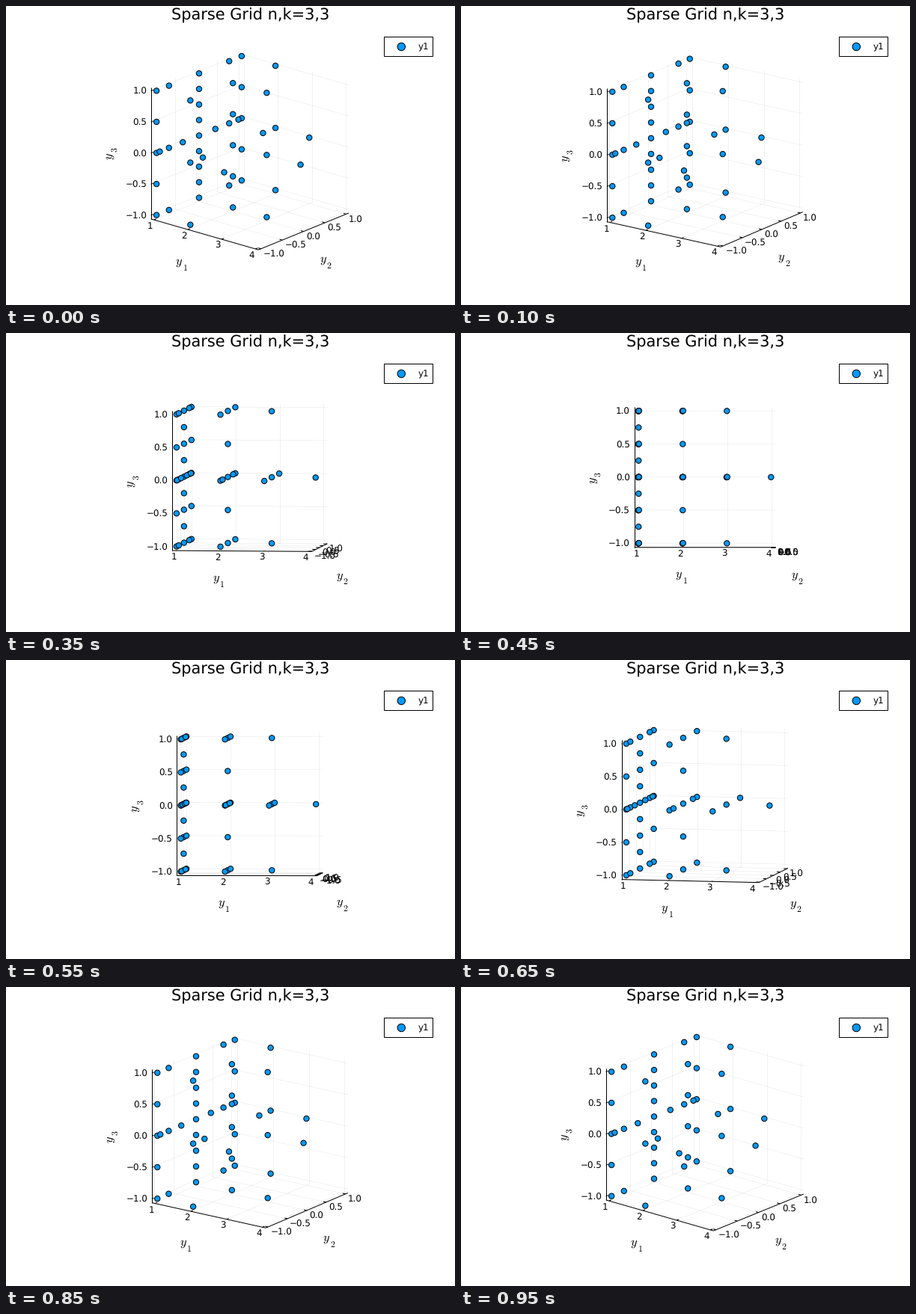
A matplotlib script that plays this animation: 600x400 px, repeating every 1 s.

```python
import itertools

import matplotlib.pyplot as plt
import numpy as np
from matplotlib.animation import FuncAnimation
from matplotlib.collections import LineCollection
from matplotlib.patches import Rectangle

WIDTH, HEIGHT, DPI = 600, 400, 100
FRAMES, INTERVAL = 20, 50
PT = 72 / DPI
BLUE = "#009afa"
CENTER = np.array([325.8, 192.8])
SCALE = 93.8
TICK_PX, GUIDE_PX, SUB_PX, TITLE_PX = 11.9, 16.4, 11.9, 20.9
TICK_LEN = 0.05
PAD = 1.06

plt.rcParams["font.family"] = "DejaVu Sans"
plt.rcParams["mathtext.fontset"] = "cm"
plt.rcParams["text.hinting"] = "none"


def norm_x(value):
    return (value - 2.5) / (1.5 * PAD)


def norm_yz(value):
    return value / PAD


X_TICKS = [1, 2, 3, 4]
YZ_TICKS = [-1, -0.5, 0, 0.5, 1]


def new_nodes(level, kind):
    """Nodes that a one-dimensional rule adds at the given level."""
    if kind == "count":
        return [level + 1]
    if level == 0:
        return [0.0]
    if level == 1:
        return [-1.0, 1.0]
    steps = np.arange(1, 2**level, 2) / 2**level
    return -np.cos(np.pi * steps) if kind == "chebyshev" else 2 * steps - 1


def sparse_grid(depth=3):
    levels = [lv for lv in itertools.product(range(depth + 1), repeat=3) if sum(lv) <= depth]
    points = []
    for a, b, c in sorted(levels, key=sum):
        points += itertools.product(
            new_nodes(a, "count"), new_nodes(b, "chebyshev"), new_nodes(c, "uniform")
        )
    points = np.array(points)
    return np.column_stack([norm_x(points[:, 0]), norm_yz(points[:, 1:])])


def camera(frame):
    azimuth = 20 * (1 + np.cos(2 * np.pi * frame / (FRAMES - 1)))
    return np.radians(azimuth), np.radians(azimuth / 2)


def project(points, azimuth, elevation):
    x, y, z = np.moveaxis(np.asarray(points, float), -1, 0)
    right = np.cos(azimuth) * x + np.sin(azimuth) * y
    depth = np.cos(azimuth) * y - np.sin(azimuth) * x
    up = np.sin(elevation) * depth + np.cos(elevation) * z
    return CENTER + SCALE * np.stack([right, -up], axis=-1)


XS = [norm_x(v) for v in X_TICKS]
YS = [norm_yz(v) for v in YZ_TICKS]
POINTS = sparse_grid()

GRID = []
for x in XS:
    GRID += [[(x, -1, -1), (x, 1, -1)], [(x, 1, -1), (x, 1, 1)]]
for v in YS:
    GRID += [
        [(-1, v, -1), (1, v, -1)],
        [(-1, v, -1), (-1, v, 1)],
        [(-1, -1, v), (-1, 1, v)],
        [(-1, 1, v), (1, 1, v)],
    ]

AXES = [
    [(-1, -1, -1), (1, -1, -1)],
    [(1, -1, -1), (1, 1, -1)],
    [(-1, -1, -1), (-1, -1, 1)],
]
AXES += [[(x, -1, -1), (x, -1 + TICK_LEN, -1)] for x in XS]
AXES += [[(1, y, -1), (1 - TICK_LEN, y, -1)] for y in YS]
AXES += [[(-1, -1, z), (-1, -1 + TICK_LEN, z)] for z in YS]

fig = plt.figure(figsize=(WIDTH / DPI, HEIGHT / DPI), dpi=DPI, facecolor="white")
ax = fig.add_axes([0, 0, 1, 1])
ax.set(xlim=(0, WIDTH), ylim=(HEIGHT, 0))
ax.axis("off")


def label(text, size, x=0, y=0, **style):
    style = {"ha": "center", "va": "baseline", "zorder": 4, **style}
    return ax.text(x, y, text, fontsize=size * PT, color="black", **style)


def dots(positions, diameter):
    # Two edge colours make the renderer keep sub-pixel positions.
    return ax.scatter(*np.transpose(positions), s=(diameter * PT) ** 2, c=BLUE,
                      edgecolors=["black", "black"], linewidths=PT, zorder=3)


label("Sparse Grid n,k=3,3", TITLE_PX, 326.4, 19)
ax.add_patch(Rectangle((505, 41), 65, 26, fill=False, ec="black", lw=PT))
dots([(528.3, 54.5)], 10.4)
label("y1", TICK_PX, 550.4, 58.6, ha="left")

grid = ax.add_collection(LineCollection([], colors="black", alpha=0.1, linewidths=0.5 * PT, zorder=1))
axes = ax.add_collection(LineCollection([], colors="black", linewidths=PT, zorder=2))
scatter = dots(np.zeros((len(POINTS), 2)), 7.3)

decimals = [f"{v:.1f}".replace("-", "\u2212") for v in YZ_TICKS]
x_labels = [label(str(v), TICK_PX) for v in X_TICKS]
y_labels = [label(t, TICK_PX, ha="left") for t in decimals]
z_labels = [label(t, TICK_PX, ha="right") for t in decimals]


def guide(index, anchor, shift, sub_shift, rotation=0):
    """Letter and subscript at fixed pixel offsets from the middle of an axis."""
    style = dict(va="center", rotation=rotation)
    letter = label("$y$", GUIDE_PX, **style)
    subscript = label(f"${index}$", SUB_PX, **style)
    return [(letter, anchor, shift), (subscript, anchor, np.add(shift, sub_shift))]


GUIDES = (
    guide(1, (0, -1, -1), (-34, 37.8), (7.7, 7))
    + guide(2, (1, 0, -1), (26.6, 38.8), (7.9, 7))
    + guide(3, (-1, -1, 0), (-54.4, 4.2), (7, -8.2), rotation=90)
)


def update(frame):
    view = camera(frame)
    grid.set_segments(project(GRID, *view))
    axes.set_segments(project(AXES, *view))
    scatter.set_offsets(project(POINTS, *view))

    drop = 0.365 * TICK_PX
    x_shift = (-2.6 - 4 * np.sin(view[0]), 7.8 + drop)
    tick_groups = [
        (x_labels, [(x, -1, -1) for x in XS], x_shift),
        (y_labels, [(1, y, -1) for y in YS], (3.1, 6.7 + drop)),
        (z_labels, [(-1, -1, z) for z in YS], (-5.5, 0.3 + drop)),
    ]
    for texts, anchors, shift in tick_groups:
        for text, position in zip(texts, project(anchors, *view) + shift):
            text.set_position(position)
    for text, anchor, shift in GUIDES:
        text.set_position(project(anchor, *view) + shift)


anim = FuncAnimation(fig, update, frames=FRAMES, init_func=lambda: update(0),
                     interval=INTERVAL, repeat=True, repeat_delay=0)
plt.show()
```
